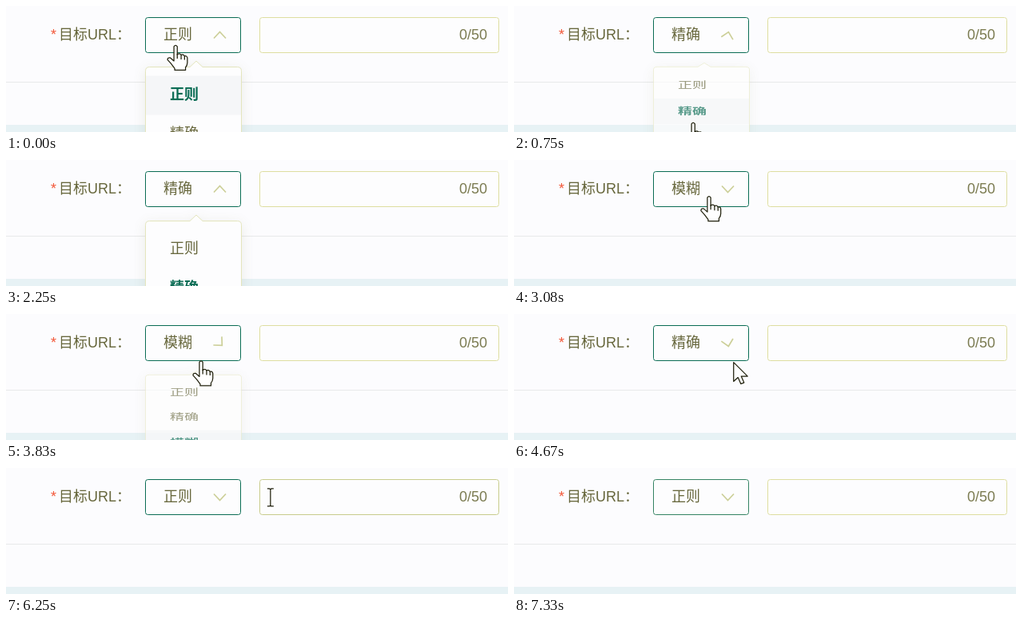
An HTML page with a canvas for the animation above (7410 ms loop, 628x158 px).

```html
<!DOCTYPE html>
<html lang="zh-CN">
<head>
<meta charset="utf-8">
<title>目标URL</title>
<style>
html, body { margin: 0; width: 100%; height: 100%; overflow: hidden; background: #fcfcfe; }
canvas { display: block; }
</style>
</head>
<body>
<canvas id="stage" width="628" height="158"></canvas>
<script>
const ctx = document.getElementById('stage').getContext('2d');
const LOOP = 7410;
const TICK = 1000 / 12;
const FONT = '"Liberation Sans", "Noto Sans CJK SC", "Noto Sans CJK", sans-serif';
const OPTIONS = ['正则', '精确', '模糊'];
const ROW = 49;
const PAPER = '#fdfdfe';
const OLIVE = '#67673c';
const GREEN = [10, 108, 84];
const PALE = [222, 222, 160];

// Each visit opens the menu at (x, y) and picks an option; times in ticks of 1/12 s.
const visits = [
  { open: -9, close: 8.7, pick: 1, x: 212, y: 48 },
  { open: 19.7, close: 32.6, pick: 2, x: 241, y: 42 },
  { open: 45.35, close: 53.54, pick: 1, x: 244, y: 38 },
  { open: 62.9, close: 71.6, pick: 0, x: 284, y: 30 }
];

const clamp = v => Math.max(0, Math.min(1, v));
const mix = (a, b, p) => a + (b - a) * p;
const mixPoint = (a, b, p) => ({ x: mix(a.x, b.x, p), y: mix(a.y, b.y, p) });
const smooth = p => p * p * (3 - 2 * p);
const easeOut = p => 1 - (1 - p) ** 4;
const rgb = (a, b = a, p = 0) => `rgb(${a.map((v, i) => Math.round(mix(v, b[i], p)))})`;

function bezier(x1, y1, x2, y2) {
  const axis = (a, b, u) => 3 * (1 - u) ** 2 * u * a + 3 * (1 - u) * u * u * b + u ** 3;
  return x => {
    if (x <= 0 || x >= 1) return clamp(x);
    let lo = 0, hi = 1;
    for (let i = 0; i < 24; i++) {
      const mid = (lo + hi) / 2;
      if (axis(x1, x2, mid) < x) lo = mid; else hi = mid;
    }
    return axis(y1, y2, (lo + hi) / 2);
  };
}
const ease = bezier(.25, .1, .25, 1);
const zoom = bezier(.23, 1, .32, 1);

function text(str, x, y, color = OLIVE, weight = 400, align = 'left') {
  ctx.font = `${weight} 18px ${FONT}`;
  ctx.textAlign = align;
  ctx.fillStyle = color;
  ctx.fillText(str, x, y);
}

function box(x, y, w, h, color) {
  ctx.beginPath();
  ctx.roundRect(x, y, w, h, 3);
  ctx.fillStyle = PAPER;
  ctx.fill();
  ctx.strokeStyle = color;
  ctx.lineWidth = 1;
  ctx.stroke();
}

function chevron(angle) {
  ctx.save();
  ctx.translate(267.5, 36.5);
  ctx.rotate(-angle);
  ctx.strokeStyle = '#cccf98';
  ctx.lineWidth = 1.7;
  ctx.stroke(new Path2D('M-7.5-4L0 4L7.5-4'));
  ctx.restore();
}

const PANEL = new Path2D('M174.5 200V5.5Q174.5.5 179.5.5H230L238-7L246 .5H289.5Q294.5.5 294.5 5.5V200Z');
const OUTSIDE = new Path2D('M0-76H628V300H0Z');
OUTSIDE.addPath(PANEL);

function dropdown(amount, value, hover) {
  if (amount < .01) return;
  ctx.save();
  ctx.globalAlpha = amount;
  ctx.translate(0, 76);
  ctx.scale(1, amount);
  ctx.fillStyle = PAPER;
  ctx.fill(PANEL);

  // The shadow stays outside, so the fading panel is not darkened by it.
  ctx.save();
  ctx.clip(OUTSIDE, 'evenodd');
  ctx.shadowColor = 'rgba(110,115,60,.13)';
  ctx.shadowBlur = 16;
  ctx.shadowOffsetY = 3;
  ctx.fill(PANEL);
  ctx.restore();

  ctx.strokeStyle = '#e4e5bd';
  ctx.lineWidth = 1;
  ctx.stroke(PANEL);
  OPTIONS.forEach((name, i) => {
    const top = 11.5 + ROW * i;
    if (i === hover) {
      ctx.fillStyle = '#f5f6f8';
      ctx.fillRect(175, top, 119, ROW);
    }
    const chosen = i === value;
    text(name, 205, top + 29.5, chosen ? rgb(GREEN) : OLIVE, chosen ? 700 : 400);
  });
  ctx.restore();
}

const HAND = new Path2D('M-2 2Q0-1 2.2 2V12Q5 9.8 7 12.5Q10 11 11.3 14Q14 13 14.8 16V22' +
  'Q14.6 26 12.5 28V31.5H-1V29.5L-5.5 23.5L-10 18.5Q-10 15.2-6.5 16L-2 20Z');
const CREASES = new Path2D('M2.2 11V17M7 12.5V18M11.3 14V18.5');
const ARROW = new Path2D('M0 0V24L5.5 19L9 27L13 25.5L9.5 17.5H17.5Z');
const BEAM = new Path2D('M-4-11H-1L0-10L1-11H4M0-10V10M-4 11H-1L0 10L1 11H4');

const optionSpot = visit => ({ x: mix(visit.x, 243, .3), y: 114 + ROW * visit.pick });

// Rises across the text field, then falls off the stage.
function leaveAt(from, p) {
  return { x: mix(from.x, 470, p), y: mix(from.y, 170, p) - 448 * p * (1 - p) };
}

function pointerAt(k, visit, next) {
  const option = optionSpot(visit);
  if (k < visit.close) {
    const start = Math.max(visit.open, 0) - .17;
    return mixPoint(visit, option, smooth(clamp((k - start) / 3.2)));
  }
  const since = k - visit.close;
  return next ? mixPoint(option, next, easeOut(clamp(since / 8))) : leaveAt(option, clamp(since / 11.4));
}

const inside = (p, x, y, right, bottom) => p.x >= x && p.x <= right && p.y >= y && p.y <= bottom;
const overInput = p => inside(p, 317, 14, 617, 59);

function pointer(p, open) {
  if (p.y > 162) return;
  ctx.save();
  ctx.translate(p.x, p.y);
  ctx.strokeStyle = '#20200c';
  ctx.fillStyle = '#fff';
  ctx.lineWidth = 1.25;
  ctx.lineJoin = 'round';
  const clickable = inside(p, 174, 14, 294, 59.5) || open > .3 && inside(p, 174, 76, 294, 240);
  if (overInput(p)) {
    ctx.stroke(BEAM);
  } else {
    const shape = clickable ? HAND : ARROW;
    ctx.fill(shape);
    ctx.stroke(shape);
    if (clickable) ctx.stroke(CREASES);
  }
  ctx.restore();
}

function draw(k) {
  const index = visits.findLastIndex(v => v.open <= k);
  const visit = visits[index];
  const previous = index ? visits[index - 1].pick : 0;
  const closing = k >= visit.close;
  const progress = clamp((k - (closing ? visit.close : visit.open)) * TICK / 300);
  const shown = curve => closing ? 1 - curve(progress) : curve(progress);
  const value = closing ? visit.pick : previous;
  const hover = k < mix(visit.open, visit.close, .56) ? previous : visit.pick;
  const p = pointerAt(k, visit, visits[index + 1]);
  const blur = clamp((k - 86) * .1);

  ctx.fillStyle = '#fcfcfe';
  ctx.fillRect(0, 0, 628, 158);
  ctx.fillStyle = '#e8e9ea';
  ctx.fillRect(0, 95, 628, 1);
  ctx.fillStyle = '#e7f2f5';
  ctx.fillRect(0, 149, 628, 9);

  text('*', 56, 42, '#f2583a');
  text('目标URL：', 66, 42);
  box(174.5, 14.5, 119, 44, rgb(GREEN, PALE, blur));
  text(OPTIONS[value], 197, 42);
  chevron(Math.PI * shown(ease));
  box(317.5, 14.5, 299, 44, overInput(p) ? '#c8cc8c' : rgb(PALE));
  text('0/50', 602, 42, '#7c7c52', 400, 'right');
  dropdown(shown(zoom), value, hover);
  pointer(p, shown(zoom));
}

function frame() {
  const t = performance.now() % LOOP;
  draw(Math.floor(t / TICK + .06));
  requestAnimationFrame(frame);
}
frame();
</script>
</body>
</html>
```
